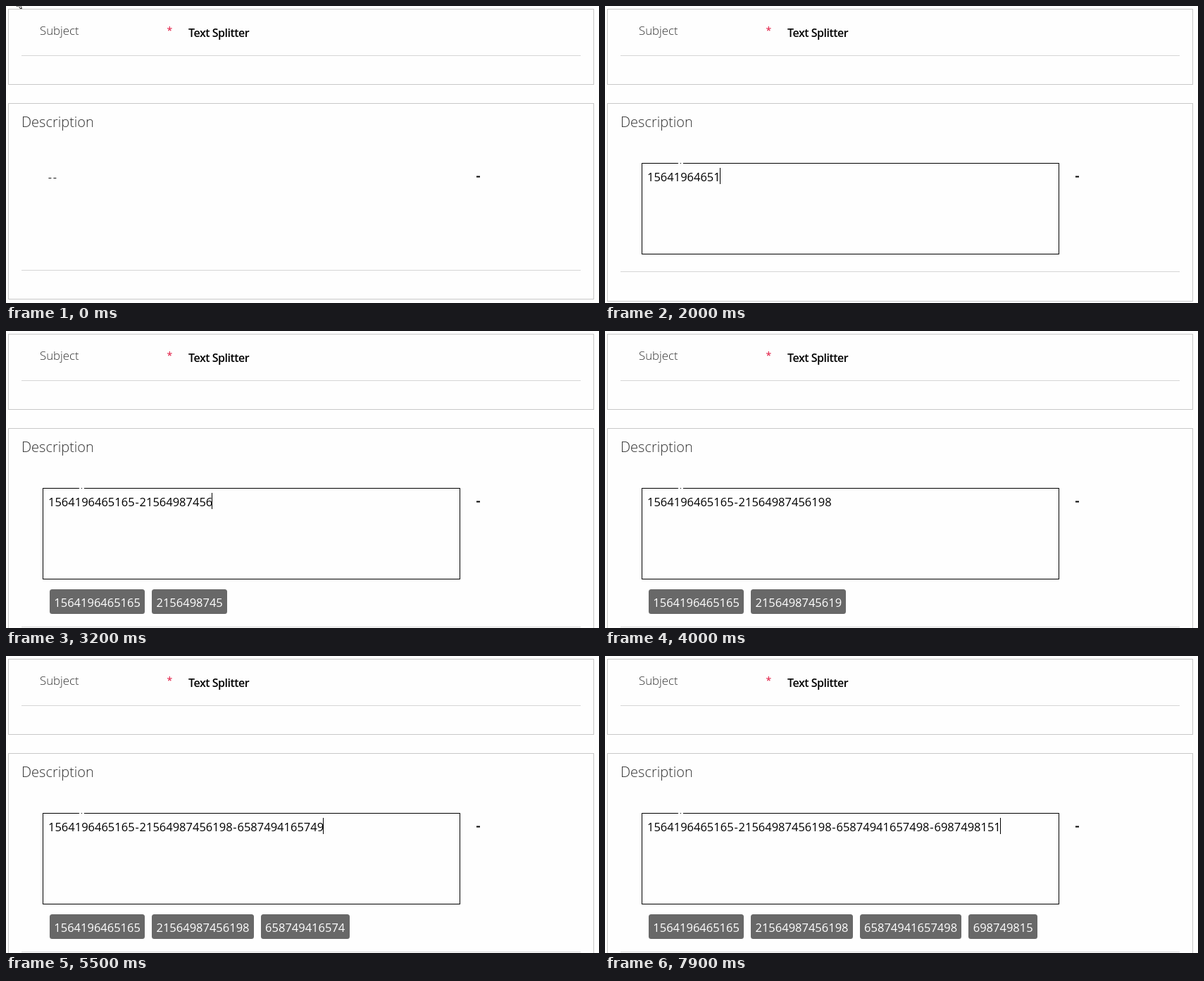
Recreate the animation shown at these times as an HTML page. Size 842 by 422 pixels, loop 8 s.

```html
<!DOCTYPE html>
<html lang="en">
<head>
<meta charset="utf-8">
<title>Text Splitter</title>
<style>
  html, body { margin: 0; width: 100%; height: 100%; overflow: hidden; background: #fefefe; }
  svg { display: block; font-family: "Open Sans", "Noto Sans", sans-serif; }
  .panel { fill: #fefefe; stroke: #c8c8c8; }
  .rule { stroke: #d6d6d6; }
  .label { fill: #333; font-weight: 350; }
  .digits { font-size: 16.5px; }
  .strong { font-weight: 600; font-size: 16px; }
  .chip rect { fill: #686868; }
  .chip text { fill: #fff; }
</style>
</head>
<body>
<svg width="842" height="422" viewBox="0 0 842 422">
  <rect class="panel" x="3.5" y="4.5" width="831" height="107"/>
  <path class="rule" d="M22 70.5H816"/>
  <text class="label" x="48" y="41" font-size="16.8">Subject</text>
  <text x="228.5" y="40" font-size="14" fill="#e0123c">*</text>
  <text class="strong" x="259" y="44" letter-spacing="-.03em">Text Splitter</text>

  <rect class="panel" id="panel" x="3.5" y="138.5" width="831"/>
  <text class="label" x="22" y="172" font-size="20">Description</text>
  <path class="rule" id="rule"/>
  <path d="M668 242.5h5" stroke="#000" stroke-width="2"/>

  <g id="box">
    <rect x="52.5" y="223.5" width="592" height="129" fill="#fefefe" stroke="#000"/>
    <path id="notch" d="M104 223.5h3m1 0h3" stroke="#fff"/>
  </g>
  <text class="digits" id="entry" y="249"></text>
  <rect id="caret" y="230" width="1" height="23"/>
  <g id="chips"></g>
  <path id="pointer" d="M15.5 -1v2l2-2 2.5 4.5h2.5l-2.5-5" fill="#fff" stroke="#222"/>
</svg>
<script>
const LOOP = 8000;
const DIGIT = 9.43, DASH = 6.95;
const ENTRY = '1564196465165-21564987456198-65874941657498-6987498151';

// Typing bursts: start time and the text length after each 100 ms tick
const BURSTS = [
  [1300, [2, 3, 5, 6, 8]],
  [1900, [10, 11, 13]],
  [2300, [14]],
  [2700, [18, 19, 21, 22, 23, 25, 26]],
  [3500, [28]],
  [4400, [29]],
  [4700, [31, 32]],
  [5000, [35, 36, 38, 39, 40, 42, 43]],
  [6000, [44]],
  [6300, [47, 49, 50, 52, 53, 54]]
];
const KEYS = [[500, 0], ...BURSTS.flatMap(([start, lengths]) =>
  lengths.map((length, i) => [start + i * 100, length]))];

const $ = id => document.getElementById(id);
const set = (el, attrs) => {
  for (const name in attrs) el.setAttribute(name, attrs[name]);
  return el;
};
const make = (tag, attrs) =>
  set(document.createElementNS('http://www.w3.org/2000/svg', tag), attrs);
const show = (id, on) => $(id).setAttribute('visibility', on ? 'visible' : 'hidden');

const advance = c => c === '-' ? DASH : DIGIT;
const widthOf = s => [...s].reduce((sum, c) => sum + advance(c), 0);

function setText(el, s, left) {
  let x = left;
  const stops = [...s].map(c => {
    const at = c === '-' ? x + 0.8 : x;
    x += advance(c);
    return at.toFixed(2);
  });
  el.textContent = s;
  el.setAttribute('x', stops.join(' '));
}

const chipsBox = $('chips');
for (let i = 0; i < 4; i++) {
  const chip = make('g', { class: 'chip' });
  chip.append(make('rect', { y: 367, height: 35, rx: 3.5 }),
              make('text', { y: 392, class: 'digits' }));
  chipsBox.append(chip);
}

function drawChips(parts) {
  let x = 62;
  [...chipsBox.children].forEach((chip, i) => {
    const part = parts[i] || '';
    chip.style.display = part ? '' : 'none';
    if (!part) return;
    const width = widthOf(part) + 12.6;
    const left = Math.round(x);
    set(chip.firstChild, { x: left, width: Math.round(x + width) - left });
    setText(chip.lastChild, part, x + 6.3);
    x += width + 10;
  });
}

let lastState = '';

function draw(t) {
  const [keyTime, length] = KEYS.findLast(([time]) => time <= t) || [0, 0];
  const open = t >= 300;
  const notched = t >= 700;
  const pointer = t < 200;
  const blinkOn = t >= 500 && (t - keyTime) % 1000 < 500;
  const state = [length, open, notched, pointer, blinkOn].join();
  if (state === lastState) return;
  lastState = state;

  const typed = ENTRY.slice(0, length);
  const parts = typed.includes('-') ? typed.slice(0, -1).split('-') : [];

  show('pointer', pointer);
  $('box').style.display = open ? '' : 'none';
  $('notch').style.display = notched ? '' : 'none';
  show('caret', blinkOn);
  set($('caret'), { x: length ? Math.floor(59.5 + widthOf(typed)) : 60 });
  set($('entry'), { fill: length ? '#000' : open ? '#777' : '#333' });
  setText($('entry'), typed || '--', open ? 60 : 59);
  set($('panel'), { height: parts.length ? 324 : open ? 281 : 278 });
  set($('rule'), { d: `M22 ${parts.length ? 420.5 : open ? 377.5 : 375.5}H816` });
  drawChips(parts);
}

function tick() {
  draw(performance.now() % LOOP);
  requestAnimationFrame(tick);
}
tick();
</script>
</body>
</html>
```
